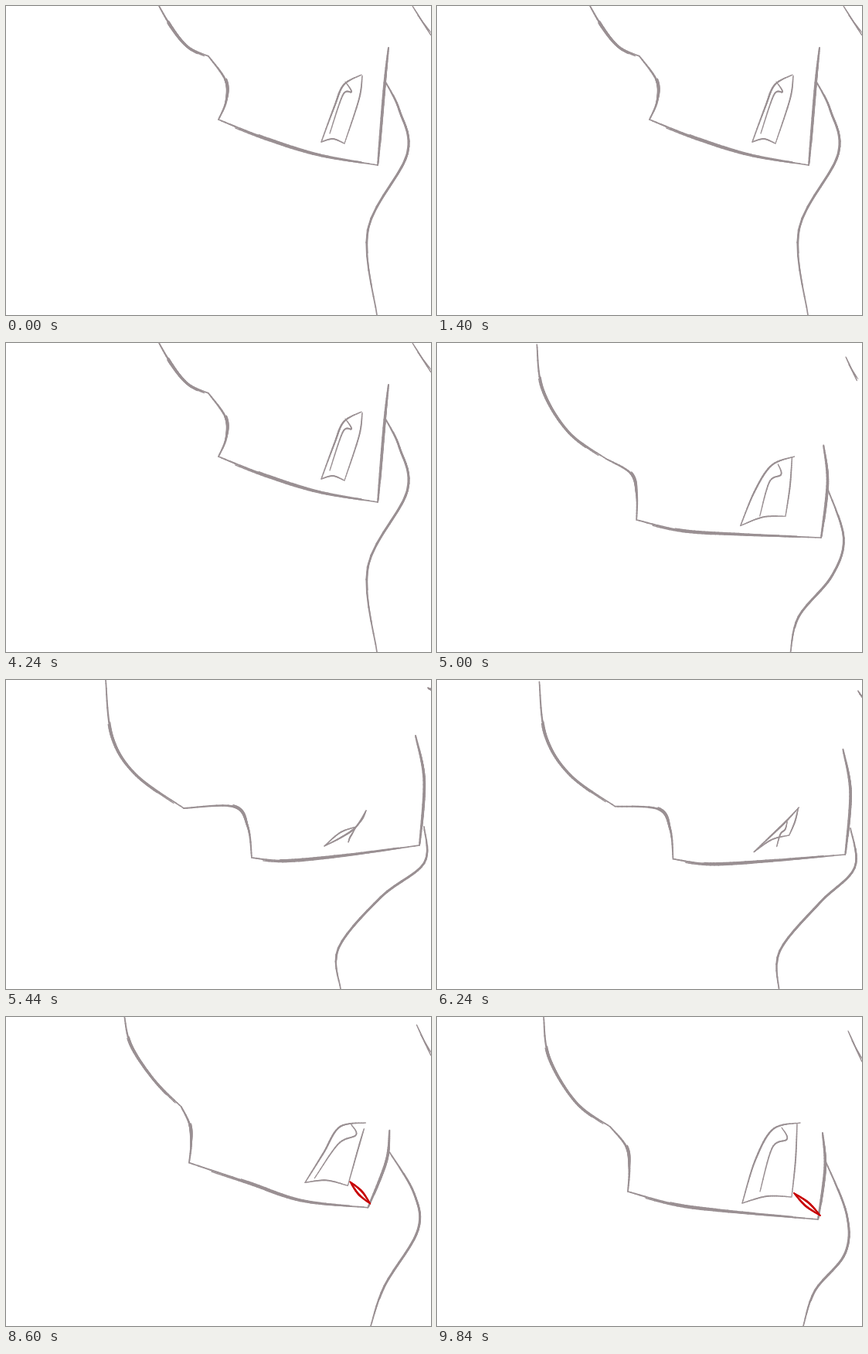
An HTML page with a canvas for the animation above (9960 ms loop, 550x400 px).

```html
<!DOCTYPE html>
<html lang="en">
<head>
<meta charset="utf-8">
<title>Rough head sketch</title>
<style>
  html, body { margin: 0; width: 100%; height: 100%; overflow: hidden; background: #fff; }
  canvas { display: block; width: 550px; height: 400px; }
</style>
</head>
<body>
<canvas id="stage" width="550" height="400"></canvas>
<script>
const ctx = document.getElementById('stage').getContext('2d');
const LOOP = 9960, MARK_TIME = 7000, SAMPLES = 28;
const PENCIL = '#9a9093', RED = '#c80004';

// Key points of each pose. The face lines are chained: each starts where the last ends.
const REST = {
  crown: [[198,0], [214,27], [236,53], [262,65]],
  snout: [[284,96], [285,123], [275,147]],
  jaw: [[335,171], [405,193], [481,206]],
  horn: [[495,54], [489,110]],
  nape: [[491,98], [509,135], [519,192], [468,290], [480,400]],
  lid: [[408,176], [425,130], [437,102], [460,89]],
  pupil: [[419,165], [436,115], [447,111], [439,98]],
  front: [[461,90], [457,120], [438,178]],
  hair: [[526,0], [550,38]]
};
const TUCKED = {
  crown: [[129,0], [137,72], [168,122], [230,166]],
  snout: [[295,164], [313,190], [318,230]],
  jaw: [[362,234], [440,227], [535,214]],
  horn: [[530,72], [541,130]],
  nape: [[541,190], [541,237], [485,281], [430,347], [433,400]],
  lid: [[412,215], [435,203], [453,190], [466,169]],
  pupil: [[443,210], [445,204], [448,199], [453,190]],
  front: [[466,169], [461,180], [453,190]],
  hair: [[546,10], [550,13]]
};
const HIGH = {
  crown: [[161,0], [170,28], [198,67], [228,103]],
  snout: [[234,125], [235,148], [232,170]],
  jaw: [[315,200], [385,231], [456,239]],
  horn: [[495,145], [487,182]],
  nape: [[493,169], [527,215], [535,262], [490,345], [471,400]],
  lid: [[383,201], [410,172], [430,141], [463,137]],
  pupil: [[390,200], [428,162], [453,150], [447,137]],
  front: [[462,148], [452,162], [434,211]],
  hair: [[531,6], [550,46]]
};
const LOW = {
  crown: [[138,0], [145,52], [180,110], [224,142]],
  snout: [[245,168], [249,195], [247,226]],
  jaw: [[310,243], [380,252], [493,262]],
  horn: [[499,150], [502,195]],
  nape: [[503,187], [530,255], [528,306], [489,354], [474,400]],
  lid: [[395,241], [412,185], [435,145], [470,137]],
  pupil: [[418,226], [434,169], [453,158], [446,143]],
  front: [[466,138], [464,185], [459,233]],
  hair: [[532,18], [550,58]]
};

const lerp = (a, b, f) => a + (b - a) * f;
const mix = (p, q, f) => p.map((v, axis) => lerp(v, q[axis], f));
const end = line => line[line.length - 1];

const mapPoints = (pose, fn) => Object.fromEntries(Object.entries(pose)
  .map(([name, line]) => [name, line.map((p, i) => fn(p, name, i))]));
const blend = (from, to, f) => mapPoints(from, (p, name, i) => mix(p, to[name][i], f));
const shift = (pose, dx, dy) => mapPoints(pose, ([x, y]) => [x + dx, y + dy]);

const UP = blend(HIGH, REST, 0.5);
const LEAN = shift(TUCKED, -26, 8);
const SETTLED = shift(TUCKED, 2, 3);

// Pencil passes over each line: the first is whole, the rest are loose partial retraces.
let seed = 7;
function random() {
  seed = (seed * 16807) % 2147483647;
  return seed / 2147483647;
}

function makePasses(count, spread, width) {
  return Array.from({ length: count }, (_, i) => {
    const loose = i ? 1 : 0;
    const offset = () => loose * spread * (2 * random() - 1);
    return {
      from: loose * 0.35 * random(), to: 1 - loose * 0.35 * random(),
      startOffset: offset(), endOffset: offset(),
      width: width * (loose ? 0.8 : 1)
    };
  });
}

const passes = {
  crown: makePasses(4, 4, 2.6),
  snout: makePasses(3, 2.5, 2.8),
  jaw: makePasses(3, 2, 2.6),
  horn: makePasses(3, 2, 3.2),
  nape: makePasses(3, 2, 2.8),
  lid: makePasses(2, 1, 2.2),
  pupil: makePasses(1, 0, 1.9),
  front: makePasses(1, 0, 1.9),
  base: makePasses(1, 0, 1.8),
  hair: makePasses(2, 3, 1.7)
};

// Each move: start, end, drawn steps, pose reached.
const moves = [];
for (const t of [0, 1400, 2800, 4240]) {
  moves.push([t, t, 1, REST], [t + 120, t + 440, 4, LOW]);
  if (t < 4240) moves.push([t + 760, t + 1080, 4, UP]);
}
moves.push(
  [5000, 5240, 4, LEAN], [5320, 5440, 2, TUCKED], [5560, 5920, 5, SETTLED],
  [6000, 6920, 14, LOW], [7000, 7200, 4, HIGH], [7520, 7720, 3, LOW],
  [8040, 8240, 4, HIGH], [8600, 8800, 3, LOW],
  [9120, 9320, 4, HIGH], [9640, 9840, 3, LOW]);

function poseAt(t) {
  let i = moves.length - 1;
  while (moves[i][0] > t) i--;
  const [start, stop, steps, to] = moves[i];
  if (t >= stop) return to;
  const step = Math.floor((t - start) / (stop - start) * (steps - 1) + 1e-6) + 1;
  const f = step / steps;
  return blend(moves[i - 1][3], to, steps > 5 ? f * f * (3 - 2 * f) : f);
}

// Catmull-Rom point at u in 0..1 along a line.
function pointAt(line, u) {
  const last = line.length - 1, pos = u * last;
  const i = Math.min(last - 1, Math.floor(pos)), f = pos - i;
  const at = k => line[Math.max(0, Math.min(last, k))];
  const [a, b, c, d] = [at(i - 1), at(i), at(i + 1), at(i + 2)];
  return b.map((v, n) => v + 0.5 * f * (c[n] - a[n] + f * (2 * a[n] - 5 * v + 4 * c[n] - d[n]
    + f * (3 * (v - c[n]) + d[n] - a[n]))));
}

function drawPass(line, pass) {
  let previous;
  for (let k = 0; k <= SAMPLES; k++) {
    const f = k / SAMPLES, u = lerp(pass.from, pass.to, f);
    const [x, y] = pointAt(line, u);
    const [x0, y0] = pointAt(line, Math.max(0, u - 0.01));
    const [x1, y1] = pointAt(line, Math.min(1, u + 0.01));
    const offset = lerp(pass.startOffset, pass.endOffset, f) / (Math.hypot(x1 - x0, y1 - y0) || 1);
    const point = [x - (y1 - y0) * offset, y + (x1 - x0) * offset];
    if (previous) {
      ctx.lineWidth = pass.width * (0.6 + 0.4 * Math.sin(Math.PI * f));
      ctx.beginPath();
      ctx.moveTo(...previous);
      ctx.lineTo(...point);
      ctx.stroke();
    }
    previous = point;
  }
}

function linesOf(pose) {
  const { crown, snout, jaw, horn, lid, front } = pose;
  const [x, y] = mix(lid[0], end(front), 0.5);
  return {
    ...pose,
    snout: [end(crown), ...snout],
    jaw: [end(snout), ...jaw],
    horn: [...horn, end(jaw)],
    base: [lid[0], [x, y - 5], end(front)]
  };
}

// The red mark spans from the eye's lower corner to the root of the horn.
function drawMark({ front, jaw }) {
  const [from, to] = [end(front), end(jaw)].map(([x, y]) => [x + 3, y - 5]);
  const [x, y] = mix(from, to, 0.5);
  ctx.strokeStyle = RED;
  for (const bow of [-2, 2]) {
    drawPass([from, [x + bow, y - bow], to], { from: 0, to: 1, startOffset: 0, endOffset: 0, width: 2.6 });
  }
}

function frame(t) {
  const pose = poseAt(t), lines = linesOf(pose);
  ctx.fillStyle = '#fff';
  ctx.fillRect(0, 0, 550, 400);
  ctx.lineCap = 'round';
  ctx.strokeStyle = PENCIL;
  for (const name in passes) passes[name].forEach(pass => drawPass(lines[name], pass));
  if (t >= MARK_TIME) drawMark(pose);
}

const begin = performance.now();
function tick() {
  frame((performance.now() - begin) % LOOP);
  requestAnimationFrame(tick);
}
tick();
</script>
</body>
</html>
```
